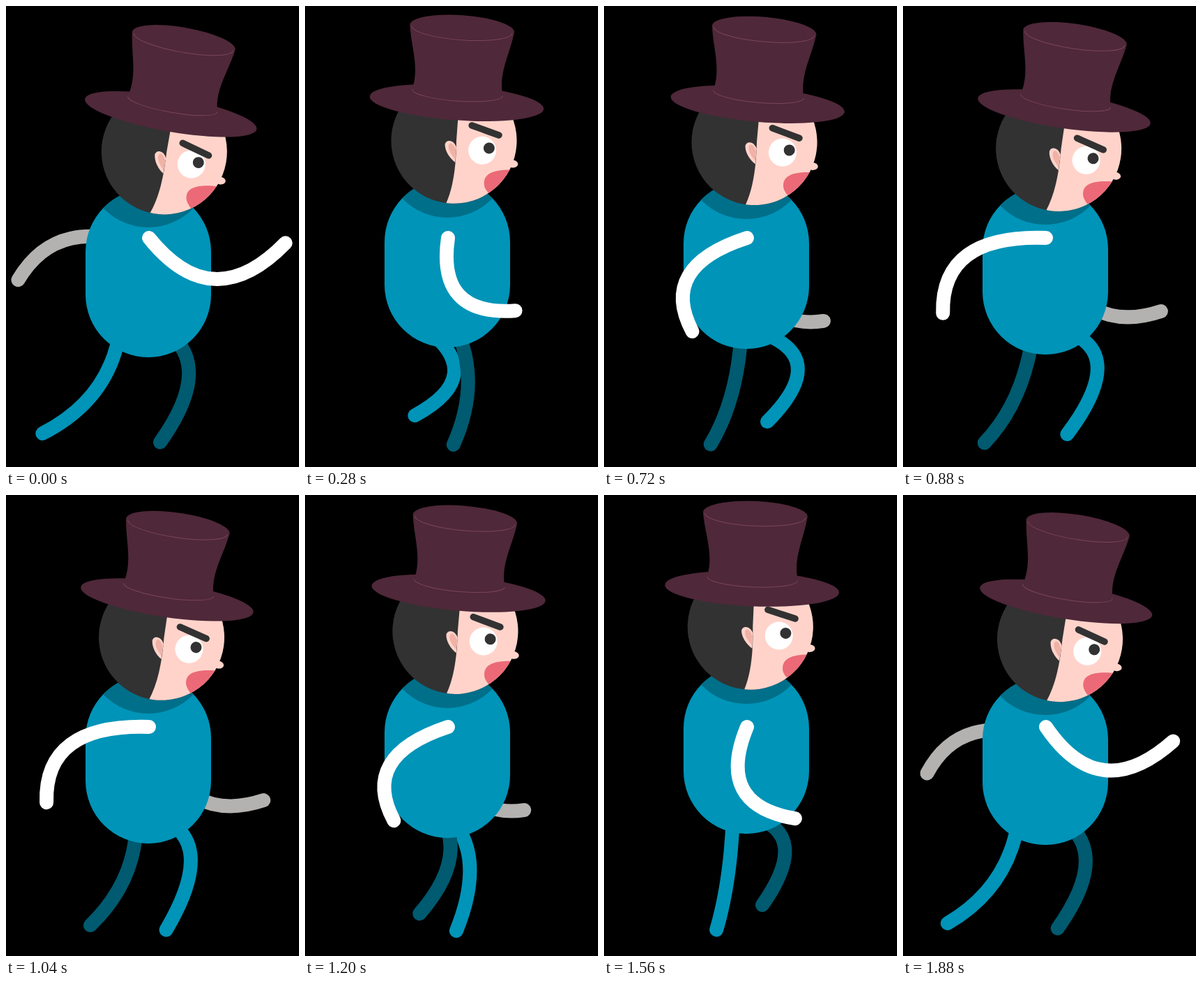
An HTML page that plays this animation: 420x660 px, repeating every 1920 ms.

```html
<!DOCTYPE html>
<html lang="en">
<head>
<meta charset="utf-8">
<title>Walking man in a top hat</title>
<style>
  html, body { margin: 0; width: 100%; height: 100%; overflow: hidden; background: #000; }
  svg { display: block; width: 100vw; height: 100vh; }
  .limb { fill: none; stroke-width: 20; stroke-linecap: round; }
  .trim { fill: none; stroke: #7b4459; stroke-width: 1; }
</style>
</head>
<body>
<svg viewBox="0 0 420 660">
  <defs>
    <clipPath id="bodyClip"><rect x="114" y="262" width="180" height="241" rx="90"/></clipPath>
    <clipPath id="headClip"><circle r="90"/></clipPath>
  </defs>

  <path id="farArm" class="limb" stroke="#b3b2b0"/>
  <path id="nearLeg" class="limb" stroke="#0094b8"/>
  <path id="farLeg" class="limb" stroke="#005a70"/>

  <g id="body">
    <rect x="114" y="262" width="180" height="241" rx="90" fill="#0094b8"/>
    <circle cx="204" cy="227" r="90" fill="#006f8a" clip-path="url(#bodyClip)"/>
  </g>

  <g id="head">
    <circle r="90" fill="#323232"/>
    <g clip-path="url(#headClip)">
      <path fill="#ffd3ca" d="M3.5-95V0C6 40 3.5 70-6.5 95H95V-95Z"/>
      <path id="mouth" fill="#ec6a77"/>
    </g>
    <ellipse cx="86" cy="27" rx="8" ry="5.5" fill="#ffd3ca"/>
    <path fill="#ffd3ca" d="M4 31C-4 26-12 16-12.5 6C-11-2 0-1 4 9Z"/>
    <path fill="#f0b1a6" d="M3.5 26C-3 20-9 12-7 6C-5 1 1 6 3.5 13Z"/>
    <circle cx="41.5" cy="11" r="20" fill="#fff"/>
    <circle cx="51" cy="7" r="8" fill="#323232"/>
    <path id="brow" fill="none" stroke="#323232" stroke-width="9.5" stroke-linecap="round" d="M24-16.5L63.7-5.5"/>
    <g fill="#4f2839">
      <ellipse cy="-54.5" rx="125" ry="25"/>
      <path d="M-75-161C-71-130-58-104-64-74L-60-60H60L64-74C58-104 71-130 75-161A75 19 0 0 0-75-161Z"/>
    </g>
    <path class="trim" d="M-72-159.5A72 15 0 0 0 72-159.5"/>
    <path class="trim" d="M-65-69A65 12 0 0 0 65-69"/>
  </g>

  <path id="nearArm" class="limb" stroke="#fff"/>
</svg>
<script>
const LOOP = 1920, BEATS = 4;
const el = id => document.getElementById(id);
const move = (id, transform) => el(id).setAttribute('transform', transform);

// Linear wave over one stride: 1 at beat 0, 0 at 1, -1 at 2, 0 at 3.
const wave = beat => Math.abs((beat + BEATS) % BEATS - 2) - 1;

function bend(id, x, y, controlX, controlY, endX, endY) {
  el(id).setAttribute('d', `M${x} ${y}Q${controlX} ${controlY} ${endX} ${endY}`);
}

function draw(time) {
  const beat = time % LOOP / LOOP * BEATS;
  const swing = wave(beat), lift = wave(beat - 1);
  const rise = 1 - Math.abs(swing);

  // The far limbs run half a stride behind, so their swing and lift are negated.
  bend('nearArm', 205, 332,
    170 + 127 * swing - 58 * rise, 375 + 71 * swing + 68 * rise,
    212 + 189 * swing + 19 * rise, 383 - 44 * swing + 122 * rise);
  bend('farArm', 205, 350,
    176 - 101 * swing - 4 * rise, 386 - 92 * swing + 66 * rise,
    207 - 190 * swing + 25 * rise, 411 - 19 * swing + 61 * rise);
  bend('nearLeg', 192 - 28 * swing - 8 * rise - 8 * lift, 460,
    240 - 90 * swing + 28 * rise + 76 * lift, 521 + 41 * swing + 7 * rise - 23 * lift,
    144 - 92 * swing + 71 * rise + 17 * lift, 617 - 5 * swing - 20 * rise - 29 * lift);
  bend('farLeg', 201 + 19 * swing + 10 * rise + 2 * lift, 460,
    236 + 68 * swing + 21 * rise - 40 * lift, 536 - 28 * swing - 18 * rise + 41 * lift,
    160 + 61 * swing + 58 * rise - 11 * lift, 624.5 - 22 * rise + 28 * lift);

  const bob = `translate(0 ${-24 * rise})`;
  move('body', bob);
  move('head', `${bob} rotate(${10 * (1 - rise)} 204 338) translate(204 206.5)`);
  move('brow', `translate(0 ${-12 * rise})`);

  const lip = 42.4 + 8.6 * rise;
  el('mouth').setAttribute('d',
    `M92 35.5C66 36 ${lip} 41 ${lip} 56.5C${lip} 64 ${lip + 4} 68 ${lip + 10} 74L100 90Z`);
}

const start = performance.now();
function tick() {
  draw(performance.now() - start);
  requestAnimationFrame(tick);
}
tick();
</script>
</body>
</html>
```
